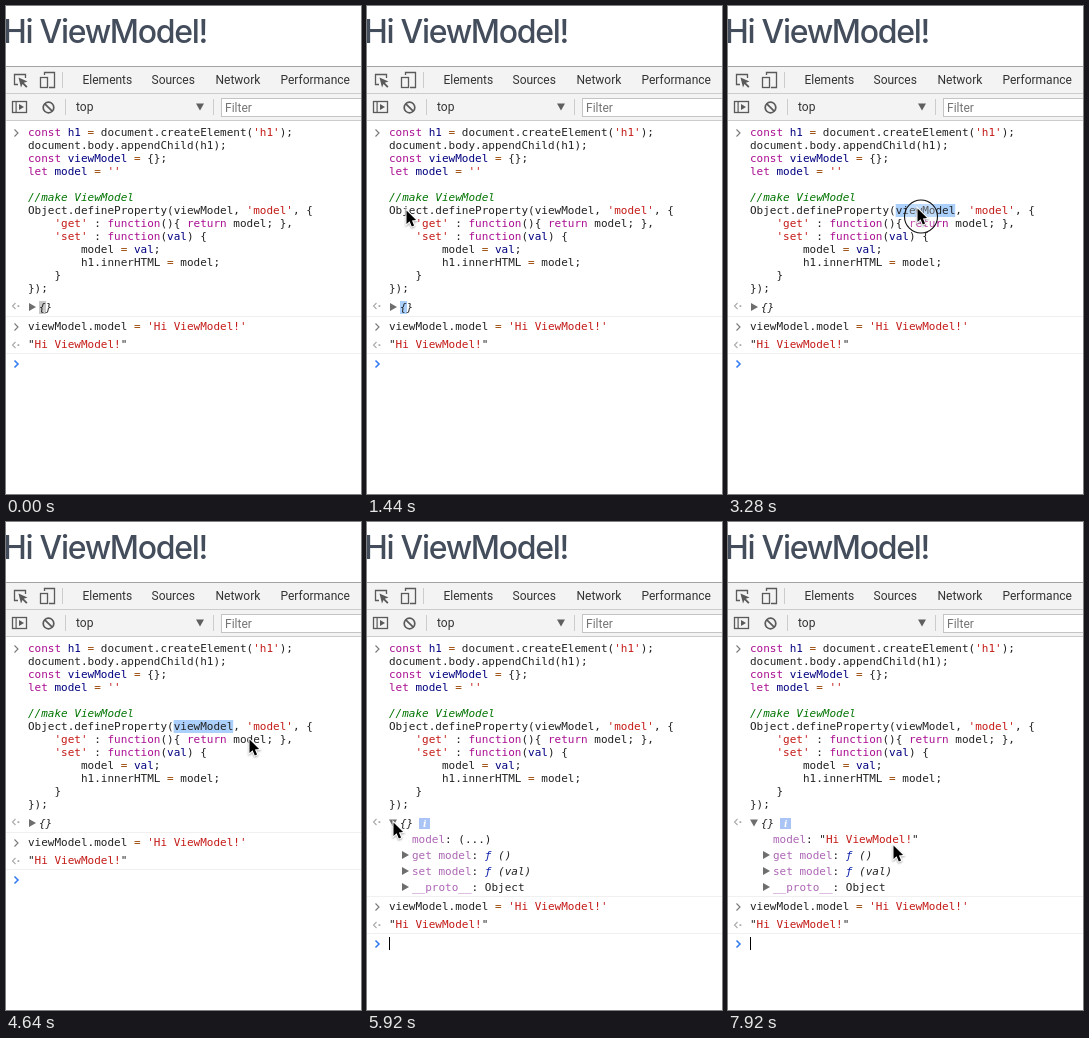
An HTML page with a canvas that plays this animation: 355 by 488 pixels, repeating every 8000 ms.

```html
<!DOCTYPE html>
<html lang="en">
<head>
<meta charset="utf-8">
<title>ViewModel console</title>
<style>
html, body { margin: 0; width: 100%; height: 100%; overflow: hidden; background: #fff; }
canvas { display: block; width: 355px; height: 488px; }
</style>
</head>
<body>
<canvas id="stage"></canvas>
<script>
const W = 355, H = 488, LOOP = 8000, STEP = 80;
const canvas = document.getElementById('stage');
const ratio = window.devicePixelRatio || 1;
canvas.width = W * ratio;
canvas.height = H * ratio;
const ctx = canvas.getContext('2d');
ctx.scale(ratio, ratio);

const MONO = '11px "DejaVu Sans Mono", monospace';
const UI = '12px Roboto, sans-serif';
const CHAR = 6.62;
const C = {
  text: '#222', key: '#aa0d91', str: '#c41a16', def: '#000080', op: '#994500',
  note: '#007400', prop: '#ac66b4', fn: '#0d22aa', grey: '#6e6e6e', pick: '#abd0fb'
};

// Inline marks: k keyword, s string, d definition, o operator, c comment.
const MARKS = { k: C.key, s: C.str, d: C.def, o: C.op, c: C.note };
const CODE = [
  '{k|const} {d|h1} {o|=} document.createElement({s|\'h1\'});',
  'document.body.appendChild(h1);',
  '{k|const} {d|viewModel} {o|=} {};',
  '{k|let} {d|model} {o|=} {s|\'\'}',
  '',
  '{c|//make ViewModel}',
  'Object.defineProperty(viewModel, {s|\'model\'}, {',
  '    {s|\'get\'} : {k|function}(){ {k|return} model; },',
  '    {s|\'set\'} : {k|function}({d|val}) {',
  '        model {o|=} {d|val};',
  '        h1.innerHTML {o|=} model;',
  '    }',
  '});'
];

// Pointer tip: time, x, y.
const PATH = [
  [80, 236, 420], [480, 281, 302], [640, 281, 302], [800, 298, 290], [1120, 298, 290],
  [1440, 39, 204], [1680, 22, 203], [1920, 22, 203], [2320, 166, 204], [2480, 166, 204],
  [2560, 163, 203], [2880, 163, 203], [3120, 189, 202], [3440, 189, 202],
  [3680, 169, 239], [3920, 141, 239], [4240, 141, 239], [4400, 246, 223],
  [4560, 246, 223], [4640, 243, 217], [4880, 243, 217], [5360, 26, 300], [6160, 26, 300],
  [6800, 97, 310], [7600, 97, 310], [7920, 165, 323]
];
const PRESSES = [[800, 960], [1840, 2640], [3120, 3440], [5520, 5760], [7440, 7680]];
const CARET = [[5680, 6240], [6720, 7200], [7520, 8000]];
const within = (t, spans) => spans.some(([a, b]) => t >= a && t < b);

function pointerAt(t) {
  const i = PATH.findIndex(p => p[0] > t);
  if (i < 0) return PATH[PATH.length - 1].slice(1);
  const [t0, x0, y0] = PATH[i - 1], [t1, x1, y1] = PATH[i];
  const u = (t - t0) / (t1 - t0), e = u * u * (3 - 2 * u);
  return [x0 + (x1 - x0) * e, y0 + (y1 - y0) * e];
}

function box(x, y, w, h, color) {
  ctx.fillStyle = color;
  ctx.fillRect(x, y, w, h);
}

function text(str, x, y, color = C.text, font = MONO) {
  ctx.font = font;
  ctx.fillStyle = color;
  ctx.fillText(str, x, y);
  return x + ctx.measureText(str).width;
}

const italic = (str, x, y, color) => text(str, x, y, color, 'italic ' + MONO);

function marked(line, x, y) {
  for (const part of line.split(/(\{[ksdoc]\|[^}]*\})/)) {
    const m = part.match(/^\{(\w)\|(.*)\}$/);
    if (!m) x = text(part, x, y);
    else x = (m[1] === 'c' ? italic : text)(m[2], x, y, MARKS[m[1]]);
  }
}

function quoted(str, x, y) {
  x = text('"', x, y);
  x = text(str, x, y, C.str);
  text('"', x, y);
}

function shape(points, fill) {
  ctx.beginPath();
  points.forEach(([x, y]) => ctx.lineTo(x, y));
  ctx.closePath();
  ctx.fillStyle = fill;
  ctx.fill();
}

function stroke(points, color, width = 1.3) {
  ctx.beginPath();
  points.forEach(([x, y]) => ctx.lineTo(x, y));
  ctx.strokeStyle = color;
  ctx.lineWidth = width;
  ctx.stroke();
}

function frame(x, y, w, h, color, width = 1.3) {
  ctx.strokeStyle = color;
  ctx.lineWidth = width;
  ctx.strokeRect(x, y, w, h);
}

const right = (x, y) => shape([[x, y - 4], [x + 7, y], [x, y + 4]], C.grey);
const down = (x, y, color = C.grey) => shape([[x, y - 3], [x + 8, y - 3], [x + 4, y + 4]], color);
const chevron = (y, color, width) => stroke([[8.5, y - 3.5], [12, y], [8.5, y + 3.5]], color, width);

function resultArrow(y) {
  stroke([[9.5, y - 3], [6.5, y], [9.5, y + 3]], '#aaa', 1.1);
  box(11.5, y - 0.8, 1.8, 1.8, '#aaa');
}

function toolbars() {
  box(0, 60, W, 55, '#f3f3f3');
  [60, 87, 114].forEach(y => box(0, y, W, 1, y === 60 ? '#a3a3a3' : '#ccc'));
  box(56, 66, 1, 16, '#ccc');
  box(59, 93, 1, 16, '#ccc');
  box(207, 93, 1, 16, '#ccc');

  const ink = '#5a5a5a';
  stroke([[12, 78.5], [8.5, 78.5], [8.5, 68.5], [19.5, 68.5], [19.5, 72]], ink);
  shape([[12.5, 71.5], [21.5, 75.5], [17.8, 76.8], [21.5, 80.5], [20.2, 81.8], [16.5, 78], [15, 81.5]], ink);
  stroke([[38.5, 69], [38.5, 66.5], [48.5, 66.5], [48.5, 81.5], [43, 81.5]], ink);
  frame(34.5, 71.5, 7, 10, ink);

  frame(6.5, 95.5, 14, 11, ink);
  box(9.5, 95, 1.2, 12, ink);
  shape([[13, 98], [18, 101], [13, 104]], ink);
  ctx.beginPath();
  ctx.arc(42.5, 101.5, 5.3, 0, Math.PI * 2);
  ctx.strokeStyle = ink;
  ctx.lineWidth = 1.7;
  ctx.stroke();
  stroke([[38.8, 97.8], [46.2, 105.2]], ink, 1.7);

  [['Elements', 76.5], ['Sources', 145.5], ['Network', 209.5], ['Performance', 274.5]]
    .forEach(([label, x]) => text(label, x, 78, '#333', UI));
  text('top', 70, 105, '#333', UI);
  down(190, 100.5, '#5f5f5f');
  box(215, 92, W, 19, '#fff');
  frame(215.5, 92.5, W, 18, '#c4c4c4', 1);
  text('Filter', 219, 106, '#757575', UI);
}

function selections(t, tipX) {
  if (t < 1840) box(33, 295, 7, 13, t < 800 ? '#c8c8c8' : C.pick);
  else if (t < 3120) {
    const count = Math.max(0, Math.min(21, Math.round((tipX - 22) / CHAR)));
    box(22, 198, count * CHAR, 13, C.pick);
  } else if (t >= 3200 && t < 5520) box(22 + 22 * CHAR, 198, 9 * CHAR, 13, C.pick);
}

function properties(t) {
  box(52, 296, 11, 11, '#a9c4f5');
  text('i', 56, 305, '#fff', 'italic bold 9px "DejaVu Serif", "Noto Serif", serif');
  const rows = ['model', 'get model', 'set model', '__proto__'];
  rows.forEach((name, i) => {
    const y = 321 + i * 16;
    if (i) right(35, y - 4);
    let x = text(name, 45, y, C.prop);
    x = text(': ', x, y);
    if (i === 0) t < 7680 ? text('(...)', x, y) : quoted('Hi ViewModel!', x, y);
    else if (i === 3) text('Object', x, y);
    else italic(i === 1 ? ' ()' : ' (val)', italic('ƒ', x, y, C.fn), y);
  });
}

function consoleRows(t, tipX) {
  const open = t >= 5600, dy = open ? 64 : 0;
  selections(t, tipX);
  chevron(127, '#777', 1.1);
  CODE.forEach((line, i) => marked(line, 22, 130 + i * 13));
  resultArrow(300);
  if (open) down(22, 300.5);
  else right(23, 301);
  italic('{}', 33, 305);
  if (open) properties(t);

  box(0, 310 + dy, W, 1, '#f0f0f0');
  chevron(321 + dy, '#777', 1.1);
  marked("viewModel.model {o|=} {s|'Hi ViewModel!'}", 22, 324 + dy);
  resultArrow(339 + dy);
  quoted('Hi ViewModel!', 22, 342 + dy);
  box(0, 347 + dy, W, 1, '#f0f0f0');
  chevron(358 + dy, '#367cf1', 1.6);
  if (within(t, CARET)) box(22, 415, 1, 13, '#000');
}

function pointer(t, x, y) {
  if (within(t, PRESSES)) {
    ctx.beginPath();
    ctx.arc(x + 4, y + 8.5, 16.5, 0, Math.PI * 2);
    ctx.fillStyle = 'rgba(255,255,255,.25)';
    ctx.fill();
    ctx.strokeStyle = '#111';
    ctx.lineWidth = 1.1;
    ctx.stroke();
  }
  const arrow = [[0, 0], [0, 13.5], [3.1, 10.7], [5.3, 16], [7.6, 15], [5.4, 9.9], [9.6, 9.6]]
    .map(([px, py]) => [x + px + 0.5, y + py + 0.5]);
  ctx.save();
  ctx.shadowColor = 'rgba(0,0,0,.35)';
  ctx.shadowBlur = 2;
  ctx.shadowOffsetY = 1;
  stroke([...arrow, arrow[0], arrow[1]], '#fff', 2);
  ctx.restore();
  shape(arrow, '#000');
}

function draw(t) {
  box(0, 0, W, H, '#fff');
  const visible = t >= 80;
  const [x, y] = visible ? pointerAt(t) : [0, 0];
  ctx.letterSpacing = '-1.3px';
  text('Hi ViewModel!', -3, 37, '#444d5c', '500 32px Inter, sans-serif');
  ctx.letterSpacing = '0px';
  toolbars();
  consoleRows(t, x);
  if (visible) pointer(t, x, y);
}

const start = performance.now();
function tick() {
  const t = (performance.now() - start) % LOOP;
  draw(Math.floor(t / STEP) * STEP);
  requestAnimationFrame(tick);
}
tick();
</script>
</body>
</html>
```
